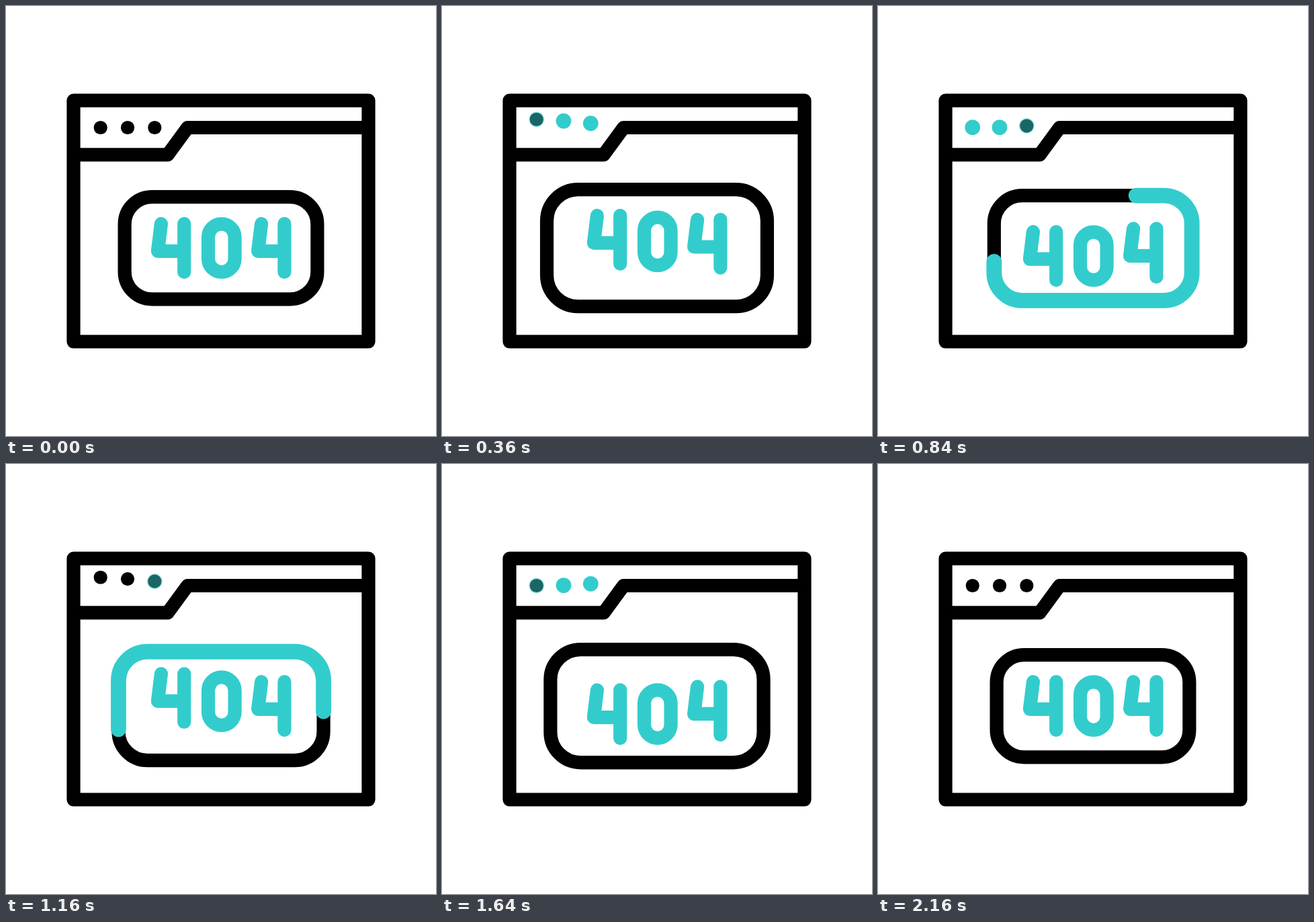
Animation of 640x640 px, one loop 2240 ms. Source, as an HTML page with a canvas:

```html
<!DOCTYPE html>
<html lang="en">
<head>
<meta charset="utf-8">
<title>404 window</title>
<style>
html, body { margin: 0; width: 100%; height: 100%; overflow: hidden; background: #fff; }
canvas { display: block; width: 640px; height: 640px; }
</style>
</head>
<body>
<canvas id="stage" width="640" height="640"></canvas>
<script>
const ctx = document.getElementById("stage").getContext("2d");
const LOOP = 2240, STEP = 40, LAST = 2160;
const INK = "#000", TEAL = "#33cccc";
const LINE = 20.2, GLOW = 22.8;
const BOUNCE = 12.6, LAG = 80;

const clamp = v => Math.min(1, Math.max(0, v));
const ease = p => { p = clamp(p); return p * p * (3 - 2 * p); };

// Eased track through evenly spaced keys
function track(t, span, keys) {
  const i = Math.min(keys.length - 2, Math.max(0, Math.floor(t / span)));
  return keys[i] + (keys[i + 1] - keys[i]) * ease(t / span - i);
}

function stroke(color, width, draw) {
  ctx.beginPath();
  draw();
  ctx.strokeStyle = color;
  ctx.lineWidth = width;
  ctx.stroke();
}

function poly(points) {
  points.forEach(([x, y], i) => i ? ctx.lineTo(x, y) : ctx.moveTo(x, y));
}

function disc(x, y, r, color) {
  ctx.beginPath();
  ctx.arc(x, y, r, 0, Math.PI * 2);
  ctx.fillStyle = color;
  ctx.fill();
}

// Clockwise from the left end of the top edge
function roundBox(cx, cy, hw, hh, r) {
  const l = cx - hw, t = cy - hh, b = cy + hh, e = cx + hw, q = Math.PI / 2;
  ctx.moveTo(l + r, t);
  ctx.lineTo(e - r, t);
  ctx.arc(e - r, t + r, r, -q, 0);
  ctx.lineTo(e, b - r);
  ctx.arc(e - r, b - r, r, 0, q);
  ctx.lineTo(l + r, b);
  ctx.arc(l + r, b - r, r, q, 2 * q);
  ctx.lineTo(l, t + r);
  ctx.arc(l + r, t + r, r, 2 * q, 3 * q);
  ctx.closePath();
}

function drawWindow() {
  stroke(INK, LINE, () => {
    ctx.rect(100.5, 140.6, 439, 358.9);
  });
  ctx.lineCap = "butt";
  stroke(INK, LINE, () => poly([[100.5, 221.4], [240.6, 221.4], [270.3, 181], [539.5, 181]]));
  ctx.lineCap = "round";
}

// Three blinks, each 320 ms on and 320 ms off with short fades
function blink(t) {
  if (t < 0 || t > 1680) return 0;
  const u = t % 640;
  return u < 320 ? clamp(u / 80) : clamp(1 - (u - 320) / 80);
}

function drawDots(t) {
  for (let i = 0; i < 3; i++) {
    const local = t - i * LAG;
    const x = 140.7 + i * 40.3;
    const y = 181 + BOUNCE * track(local, 400, [0, -1, 0, -1, 0]);
    disc(x, y, 10.1, INK);
    ctx.globalAlpha = blink(local);
    disc(x, y, GLOW / 2, TEAL);
    ctx.globalAlpha = 1;
  }
}

function drawBox(t) {
  const s = 1 + 0.17 * track(t, 480, [0, 1, 0, 1, 0]);
  const hw = 143.4 * s, hh = 76.1 * s, r = 40.6 * s;
  const outline = () => roundBox(320, 360.2, hw, hh, r);
  stroke(INK, LINE, outline);

  const from = ease((t - 880) / 600), to = ease((t - 480) / 600);
  if (to - from < 0.001) return;
  const total = 4 * (hw + hh - 2 * r) + 2 * Math.PI * r;
  const turn = (t - 480) / 1760;
  const len = (to - from) * total;
  ctx.setLineDash([len, total - len]);
  ctx.lineDashOffset = -(from + turn) * total;
  stroke(TEAL, GLOW, outline);
  ctx.setLineDash([]);
}

function four(x, y) {
  poly([[x + 5, y - 36], [x, y + 4.6], [x + 39.3, y + 4.6]]);
  poly([[x + 39.3, y - 36], [x + 39.3, y + 35.7]]);
}

function drawDigits(t) {
  const shapes = [
    y => four(225.9, y),
    y => roundBox(320.8, y, 19.8, 35.8, 19.8),
    y => four(375.1, y)
  ];
  shapes.forEach((shape, i) => {
    const y = 360.2 + BOUNCE * track(t - i * LAG, 400, [0, -1, 1, -1, 1, 0]);
    stroke(TEAL, LINE, () => shape(y));
  });
}

function render(t) {
  ctx.fillStyle = "#fff";
  ctx.fillRect(0, 0, 640, 640);
  ctx.lineJoin = ctx.lineCap = "round";
  drawWindow();
  drawDots(t);
  drawBox(t);
  drawDigits(t);
}

function tick() {
  const now = performance.now() % LOOP;
  render(Math.min(LAST, Math.floor(now / STEP) * STEP));
  requestAnimationFrame(tick);
}
tick();
</script>
</body>
</html>
```
